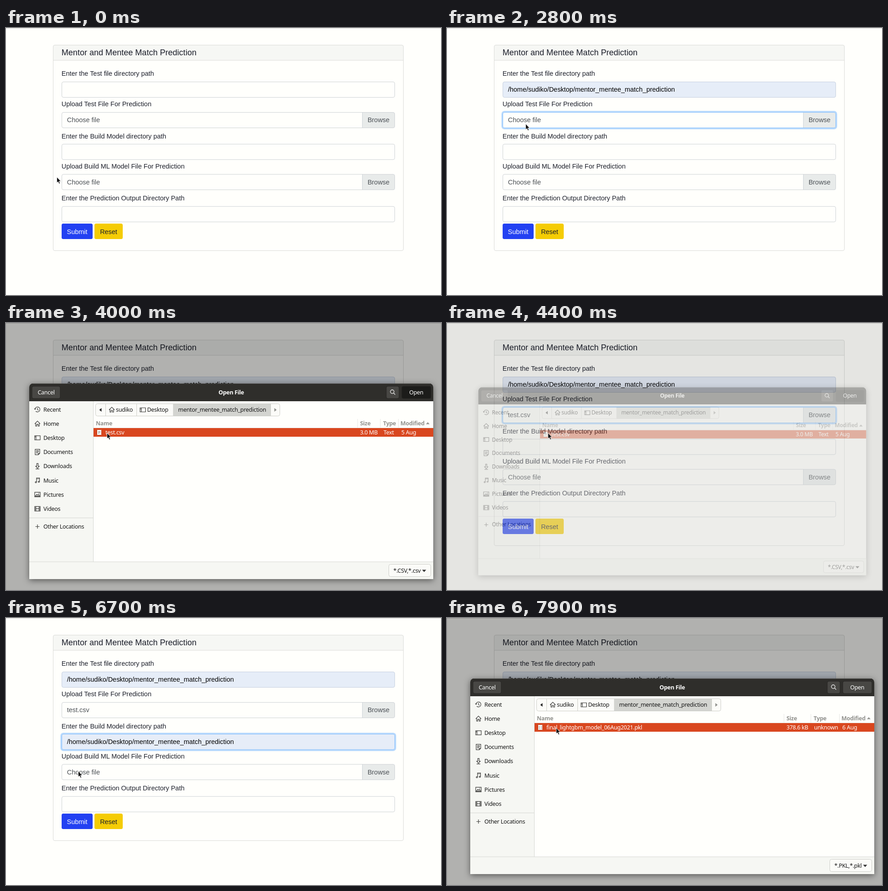
Write an HTML page that moves like this. It is 954 px wide and 587 px high and loops after 8 s.

```html
<!DOCTYPE html>
<html lang="en">
<head>
<meta charset="utf-8">
<title>Match prediction form</title>
<style>
  html, body { margin: 0; width: 100%; height: 100%; overflow: hidden; background: #fffffc; }
  svg { display: block; }
  text { white-space: pre; }
  .page { font: 14.44px "Liberation Sans", Arial, sans-serif; fill: #1c1f2b; }
  .title { font-size: 18.06px; }
  .hint { fill: #4b5055; }
  .typed { fill: #000; }
  .small { font-size: 12.03px; fill: #000; }
  .ui { font: 12.5px "Noto Sans", "Open Sans", sans-serif; letter-spacing: -.3px; fill: #161616; }
  .bold { font-weight: 700; }
  .head { font-weight: 700; fill: #92928e; }
  .light { fill: #fff; }
  .popup { font: 700 13px "Noto Sans", "Open Sans", sans-serif; letter-spacing: -.38px; fill: #222; }
  .icon { fill: none; stroke: #3a3a38; stroke-width: 1.2; }
  #dialog { filter: drop-shadow(0 3px 7px rgba(0, 0, 0, .5)); transform-origin: 494px 348px; }
</style>
</head>
<body>
<svg id="stage" width="954" height="587" viewBox="0 0 954 587"></svg>
<script>
const LOOP = 8000, STEP = 100;
const FOLDER = 'mentor_mentee_match_prediction';
const USER = 'sudiko';
const PATH = `/home/${USER}/Desktop/${FOLDER}`;

const text = (x, y, s, cls, more = '') => `<text x="${x}" y="${y}" class="${cls}" ${more}>${s}</text>`;
const mid = 'text-anchor="middle"';
const rect = (x, y, w, h, fill, more = '') =>
  `<rect x="${x}" y="${y}" width="${w}" height="${h}" fill="${fill}" ${more}/>`;
const icon = (x, y, d) => `<path class="icon" transform="translate(${x} ${y})" d="${d}"/>`;
const line = (d, color) => `<path d="${d}" fill="none" stroke="${color}"/>`;

// ---- form ----
const fields = [
  { y: 118.5, label: 'Enter the Test file directory path', base: 105.4 },
  { y: 185.5, label: 'Upload Test File For Prediction', base: 172.2, file: true },
  { y: 255.3, label: 'Enter the Build Model directory path', base: 242.8 },
  { y: 321.7, label: 'Upload Build ML Model File For Prediction', base: 309.3, file: true },
  { y: 392.3, label: 'Enter the Prediction Output Directory Path', base: 379.3 }
];

function field({ y, label, base, file }, i) {
  const fill = file
    ? text(133.8, y + 21.8, 'Choose file', 'page hint', `id="name${i}"`) +
      `<path d="M781.5 ${y}H849a3.5 3.5 0 0 1 3.5 3.5v27a3.5 3.5 0 0 1-3.5 3.5H781.5z" fill="#e8ebea"/>` +
      line(`M781.5 ${y}v34`, '#ced4da') +
      text(817, y + 21.8, 'Browse', 'page hint', mid)
    : text(133.8, y + 21.6, PATH, 'page typed', `id="full${i}"`) +
      text(133.8, y + 21.2, PATH, 'page small', `id="draft${i}"`) +
      rect(133.2, y + 8.5, 1, 17, '#000', `id="caret${i}"`);
  return text(121.8, base, label, 'page') +
    rect(120.9, y - 1.6, 733.2, 37.2, 'none', `id="ring${i}" rx="5" stroke="#b9dafd" stroke-width="3.1"`) +
    rect(122.5, y, 730, 34, '#fffffc', `id="box${i}" rx="3.5"`) + fill +
    rect(122.5, y, 730, 34, 'none', `id="edge${i}" rx="3.5"`);
}

const form =
  rect(0, 0, 954, 587, '#fffffc') + rect(0, 0, 954, 1, '#d9d9d6') +
  rect(103.5, 37.5, 768, 452, '#fffffc', 'rx="3.5"') +
  '<path d="M103.5 71V41a3.5 3.5 0 0 1 3.5-3.5H868a3.5 3.5 0 0 1 3.5 3.5V71z" fill="#f6f7f4"/>' +
  line('M103.5 71H871.5', '#dadbd8') +
  rect(103.5, 37.5, 768, 452, 'none', 'rx="3.5" stroke="#dadbd8"') +
  text(121.8, 60, 'Mentor and Mentee Match Prediction', 'page title') +
  fields.map(field).join('') +
  rect(122, 430, 68, 34, '#2341f2', 'rx="3.5"') + text(156, 452.5, 'Submit', 'page light', mid) +
  rect(194, 430, 62, 34, '#f5cc05', 'rx="3.5"') + text(225, 452.5, 'Reset', 'page', mid);

const popup = '<g id="popup">' +
  rect(122, 155, 375, 42, '#fffffc', 'style="filter:drop-shadow(0 1px 2px rgba(0,0,0,.4))"') +
  rect(122, 160, 375, 30, '#c6c7c4', 'id="hover"') +
  '<clipPath id="cut"><rect x="122" y="155" width="365" height="42"/></clipPath>' +
  text(131.5, 179.8, PATH, 'popup', 'clip-path="url(#cut)"') + '</g>';

// ---- file dialog ----
const HOUSE = 'M-6 .5L0-5.5L6 .5M-4-1V5.5H-1.5V1.5H1.5V5.5H4V-1';
const DESK = 'M-6-4.5H6V4.5H-6zM-3.2-4.5V4.5M-6-2H-3.2';
const PAGE = 'M-5-6H5V3L2 6H-5zM-3-3H3M-3-.5H3M-3 2H1M5 3H2V6';
const places = [
  ['Recent', 'M-5.5 0A5.5 5.5 0 1 1-3.8 4M-7-2L-5.5 0L-3.5-1.5M0-3.5V.5L2.5 2'],
  ['Home', HOUSE], ['Desktop', DESK], ['Documents', PAGE],
  ['Downloads', 'M-1.5-6H1.5V0H4L0 4.5L-4 0H-1.5zM-4 6H4'],
  ['Music', 'M-2 4V-5.5H4.5V3M-2-3.5H4.5M-5 4A1.5 1.3 0 1 0-2 4A1.5 1.3 0 1 0-5 4M1.5 3A1.5 1.3 0 1 0 4.5 3A1.5 1.3 0 1 0 1.5 3'],
  ['Pictures', 'M-6-5H6V5H-6zM-4.5 3.5L-1.5-.5L.5 1.5L2.5-.5L4.5 3.5zM2-2.8H3.5'],
  ['Videos', 'M-6-5H6V5H-6zM-3.5-5V5M3.5-5V5M-6-1.7H-3.5M-6 1.7H-3.5M3.5-1.7H6M3.5 1.7H6M-3.5 0H3.5']
];

function listing(id, f) {
  const [size, type] = f.cols;
  return `<g id="${id}">` +
    line(`M${size - 5.5} 211V230M${type - 6} 211V230M860.5 211V230`, '#e6e6e3') +
    text(size, 224.5, 'Size', 'ui head') + text(type, 224.5, 'Type', 'ui head') +
    rect(192, 231, 745, 19, '#d9471f') +
    rect(199.5, 234.5, 10, 12, '#fffffc', 'rx="1" stroke="#b93a18"') +
    line(f.mark, '#8a8a86') +
    text(218, 245, f.name, 'ui light') +
    text(f.end, 245, f.size, 'ui light', 'text-anchor="end"') +
    text(type + 1, 245, f.type, 'ui light') + text(867, 245, f.date, 'ui light') +
    text(879.5, 549, f.filter, 'ui', mid) + '</g>';
}

const button = (id, x, w) => rect(x, 139, w, 27, '#484744', `id="${id}" rx="3.5" stroke="#262523"`);
const dialog = '<g id="dialog">' +
  '<path d="M51 563V141a8 8 0 0 1 8-8H929a8 8 0 0 1 8 8V563z" fill="#fffffc"/>' +
  '<path d="M51 172V141a8 8 0 0 1 8-8H929a8 8 0 0 1 8 8V172z" fill="#2f2e2b"/>' +
  line('M56 133.5H932', '#4a4946') +
  rect(51, 172, 140, 353, '#f6f7f3') + rect(51, 525, 886, 38, '#f6f7f3') +
  line('M191.5 172V525M51 525H937M51 428.5H191', '#d6d7d3') +
  button('cancel', 57, 62) + text(88, 156.5, 'Cancel', 'ui light', mid) +
  text(494, 156.5, 'Open File', 'ui bold light', mid) +
  button('search', 834, 28) +
  '<path d="M851 151a4 4 0 1 1-8 0a4 4 0 1 1 8 0M850 154l3.5 3.5" fill="none" stroke="#eee" stroke-width="1.3"/>' +
  button('open', 868, 64) + text(899.7, 156.5, 'Open', 'ui light', mid) +
  places.map(([name, d], i) => {
    const y = 190 + i * 31.2;
    return icon(69, y, d) + text(82, y + 4.5, name, 'ui');
  }).join('') +
  icon(69, 447.5, 'M-4.5 0H4.5M0-4.5V4.5') + text(82, 451.5, 'Other Locations', 'ui') +
  rect(197, 177.5, 404, 27, '#fbfbf8', 'rx="4"') +
  rect(367, 177.5, 213.5, 27, '#d3d4d0') +
  rect(196.5, 177.5, 404, 27, 'none', 'rx="4" stroke="#cdcec9"') +
  line('M218.5 178V204M286.5 178V204M367 178V204M580.5 178V204', '#cdcec9') +
  '<path d="M209.5 187V195L204.5 191z" fill="#222"/><path d="M588.5 187V195L593.5 191z" fill="#8f908c"/>' +
  icon(232, 190.5, HOUSE) + text(241, 195, USER, 'ui') +
  icon(300, 191, DESK) + text(309.5, 195, 'Desktop', 'ui') + text(377.5, 195, FOLDER, 'ui') +
  line('M192 230.5H937', '#ecece9') +
  text(197, 224.5, 'Name', 'ui head') + text(865, 224.5, 'Modified', 'ui head') +
  '<path d="M921 222.5H929L925 218z" fill="#92928e"/>' +
  rect(839.5, 530.5, 92, 27, '#fbfbf8', 'rx="4" stroke="#cdcec9"') +
  '<path d="M912.5 542.5H921.5L917 547.5z" fill="#333"/>' +
  listing('csv', { cols: [776.5, 827], name: 'test.csv', size: '3.0 MB', end: 815, type: 'Text',
    date: '5 Aug', filter: '*.CSV,*.csv', mark: 'M202 238.5H207M202 240.5H207M202 242.5H205' }) +
  listing('pkl', { cols: [744.5, 804], name: 'final_lightgbm_model_06Aug2021.pkl', size: '378.6 kB', end: 792,
    type: 'unknown', date: '6 Aug', filter: '*.PKL,*.pkl', mark: 'M202.5 237V245M206.5 237V245' }) +
  '</g>';

const cursor = '<g id="cursor">' +
  '<path id="arrow" d="M.5.8V13.4L3.3 10.8L5.4 15.4L7.6 14.4L5.5 10H9.3z" fill="#111" stroke="#fff" stroke-width=".8"/>' +
  '<path id="beam" d="M-3-6.5H-1L0-5.5L1-6.5H3M0-5.5V5.5M-3 6.5H-1L0 5.5L1 6.5H3" fill="none" stroke="#222" stroke-width="1.2"/></g>';

document.getElementById('stage').innerHTML =
  form + popup + rect(0, 0, 954, 587, '#000', 'id="dim"') + dialog + cursor;

// ---- timeline ----
const el = {};
document.querySelectorAll('[id]').forEach(e => el[e.id] = e);

const moves = [
  [100, 111, 327], [200, 135, 245], [300, 157, 161], [400, 157, 161], [600, 170, 136], [700, 184, 120],
  [900, 181, 132], [1200, 181, 134], [1600, 197, 155], [1700, 198, 161], [1800, 198, 161],
  [2400, 173, 207], [2700, 172, 210], [2900, 172, 210], [3500, 197, 216], [3700, 221, 241],
  [4600, 221, 241], [5000, 159, 261], [5200, 158, 272], [5400, 158, 272], [5500, 158, 305],
  [5800, 158, 308], [6300, 158, 336], [6900, 158, 336], [7500, 218, 285], [7600, 236, 256],
  [7800, 236, 256], [7900, 239, 241]
];
const focus = [[1100, 2700], [2700, 5200], [5200, 6800], [6800, LOOP]];
const fills = { 0: { open: 1300, hover: 1500, done: 1900 }, 2: { open: 5300, hover: 5500, done: 5900 } };

const clamp = v => Math.max(0, Math.min(1, v));
const within = (t, a, b) => t >= a && t < b;
const show = (e, on) => e.style.display = on ? '' : 'none';

function position(t) {
  const i = moves.findIndex(m => m[0] > t);
  if (i < 0) return moves[moves.length - 1].slice(1);
  if (i === 0) return moves[0].slice(1);
  const [t0, x0, y0] = moves[i - 1], [t1, x1, y1] = moves[i];
  const k = (t - t0) / (t1 - t0);
  return [x0 + (x1 - x0) * k, y0 + (y1 - y0) * k];
}

function render(t) {
  fields.forEach((f, i) => {
    const [a, b] = focus[i] || [LOOP, LOOP];
    const on = within(t, a, b);
    el['ring' + i].style.opacity = on ? clamp((t - a + 50) / 150) : 0;
    if (f.file) return el['edge' + i].setAttribute('stroke', on ? '#86bffb' : '#ced2d6');
    const { hover, done } = fills[i] || { hover: LOOP, done: LOOP };
    el['edge' + i].setAttribute('stroke', on ? '#86bffb' : t >= done ? '#c6d0e0' : '#ced2d6');
    el['box' + i].setAttribute('fill', t >= hover ? '#e6edf8' : '#fffffc');
    show(el['draft' + i], within(t, hover, done));
    show(el['full' + i], t >= done);
    show(el['caret' + i], on && t < done);
  });
  el.name1.textContent = t >= 4400 ? 'test.csv' : 'Choose file';

  const low = t > 4000, f = fills[low ? 2 : 0];
  show(el.popup, within(t, f.open, f.done));
  show(el.hover, t >= f.hover);
  el.popup.setAttribute('transform', `translate(0 ${low ? 137 : 0})`);

  const shown = t < 4600 ? clamp((t - 2900) / 300) * clamp((4500 - t) / 300) : clamp((t - 6900) / 300);
  el.dim.style.opacity = .305 * shown;
  show(el.dialog, shown > 0);
  el.dialog.style.opacity = shown;
  el.dialog.style.transform = `scale(${.94 + .06 * shown})`;
  show(el.csv, t < 4600);
  show(el.pkl, t > 6000);
  el.open.setAttribute('fill', within(t, 4000, 4600) ? '#1c1c1a' : '#484744');

  const [x, y] = position(t);
  const typing = shown === 0 && fields.some(f => !f.file && x > 122 && x < 853 && y > f.y && y < f.y + 34.5);
  el.cursor.setAttribute('transform', `translate(${x} ${y})`);
  show(el.beam, typing);
  show(el.arrow, !typing);
}

const start = performance.now();
function tick() {
  const t = (performance.now() - start) % LOOP;
  render(Math.floor(t / STEP) * STEP);
  requestAnimationFrame(tick);
}
tick();
</script>
</body>
</html>
```
